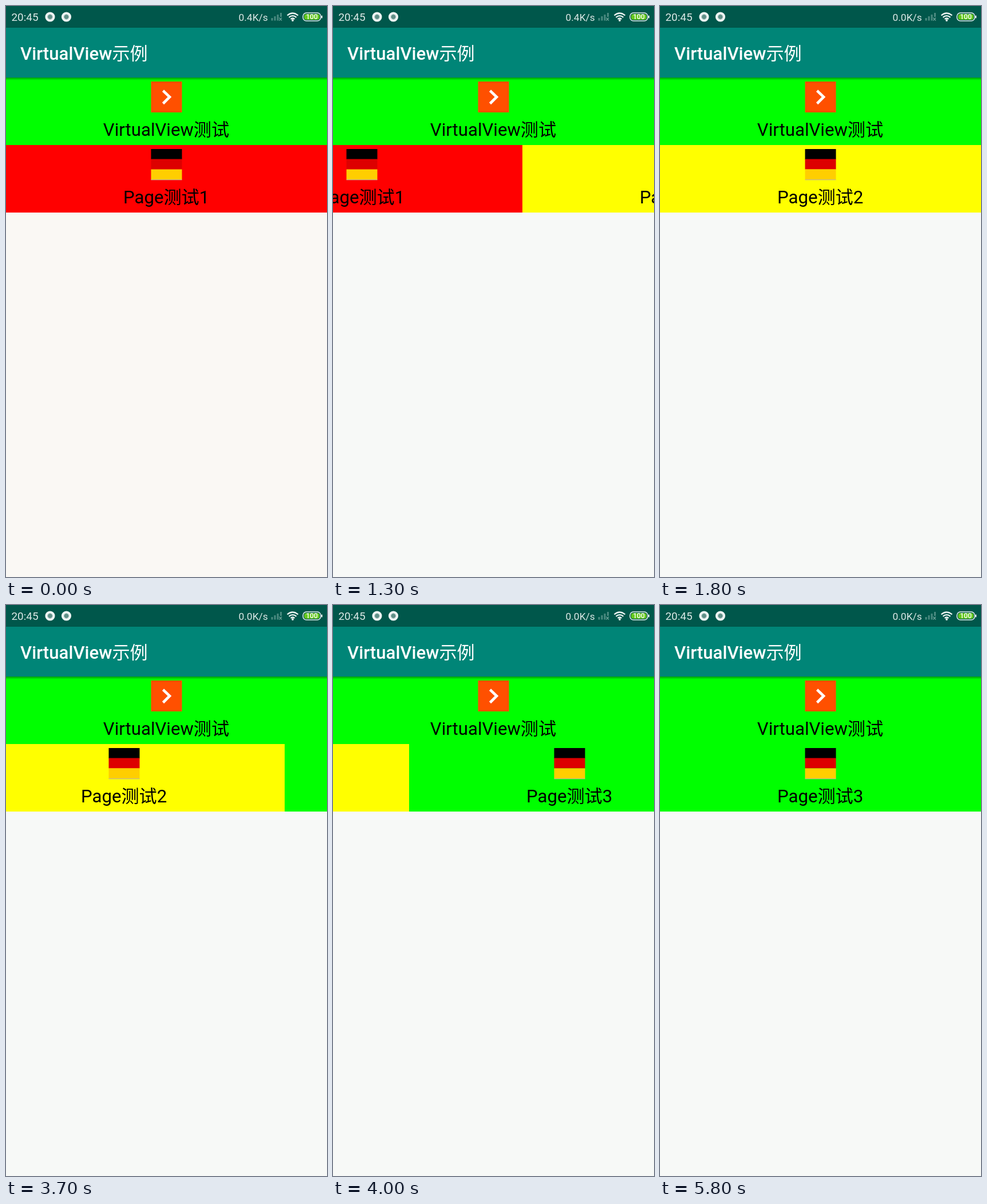
These frames come from a looping animation (561 px wide and 998 px high, 6300 ms). An HTML page:

```html
<!DOCTYPE html>
<html lang="zh">
<head>
<meta charset="utf-8">
<title>VirtualView示例</title>
<style>
  html, body { margin: 0; width: 100%; height: 100%; overflow: hidden; }
  svg { display: block; width: 561px; height: 998px; }
  text { font-family: Roboto, "Noto Sans CJK SC", "Noto Sans CJK", sans-serif; font-size: 31.16px; }
  .zh { font-weight: 300; }
</style>
</head>
<body>
<svg viewBox="0 0 561 998">
  <defs>
    <linearGradient id="shade" x2="0" y2="1">
      <stop stop-color="#003c20" stop-opacity=".5"/>
      <stop offset="1" stop-color="#003c20" stop-opacity="0"/>
    </linearGradient>
    <g id="flag">
      <rect x="253.5" y="250" width="54" height="18" fill="#000"/>
      <rect x="253.5" y="267.5" width="54" height="18" fill="#d00"/>
      <rect x="253.5" y="285.5" width="54" height="18" fill="#ffce00"/>
      <rect x="253.5" y="303" width="54" height="1.3" fill="#c8b888"/>
    </g>
    <g id="dot">
      <circle r="8.6" fill="#eef4f3"/>
      <circle r="4.2" fill="#5f8f87" stroke="#a9c3be"/>
    </g>
  </defs>

  <rect id="backdrop" width="561" height="998"/>
  <g id="pages"></g>

  <rect y="125" width="561" height="118" fill="#0f0"/>
  <rect y="125" width="561" height="5" fill="url(#shade)"/>
  <rect x="253.5" y="132" width="54" height="54" fill="#ff5000"/>
  <path d="M274.5 148 L286 159 L274.5 170.5" fill="none" stroke="#fff" stroke-width="4.6"/>
  <text x="280" y="227" text-anchor="middle">VirtualView<tspan class="zh">测试</tspan></text>

  <rect y="38" width="561" height="87" fill="#008577"/>
  <text x="25" y="93.5" fill="#fff" font-weight="500">VirtualView<tspan class="zh">示例</tspan></text>

  <rect width="561" height="38" fill="#00574b"/>
  <g fill="#dce8e6">
    <text x="9.5" y="26" style="font-size:18.9px">20:45</text>
    <text id="speed" x="406.5" y="26" style="font-size:17.4px"></text>
  </g>
  <use href="#dot" x="77" y="19"/>
  <use href="#dot" x="105.5" y="19"/>

  <g fill="#4a8a80">
    <path d="M463.5 21h3v4.500h-3zM468.500 18h3v7.500h-3zM473.500 15h3v10.500h-3zM479 12h3v7h-3z"/>
    <path d="M477.500 20.500l4.500 5m0-5l-4.500 5" fill="none" stroke="#6ba097" stroke-width="1.400"/>
  </g>
  <g fill="none" stroke="#eef4f3" stroke-width="2.200">
    <path d="M491.500 16.500Q501 8.500 510.500 16.500M494.500 19.800Q501 14.300 507.500 19.800M497.500 23Q501 20 504.500 23"/>
    <circle cx="501" cy="25" r=".8"/>
  </g>
  <rect x="519" y="12" width="31" height="14" rx="6" fill="#00574b" stroke="#e6f0ee" stroke-width="1.500"/>
  <rect x="521" y="14" width="27" height="10" rx="4" fill="#64c81e"/>
  <rect x="551" y="16.500" width="2" height="5" rx="1" fill="#e6f0ee"/>
  <text x="534.500" y="23.300" text-anchor="middle" fill="#fff" font-weight="500" style="font-size:12px">100</text>
</svg>
<script>
const LOOP = 6300, STEP = 100, WIDTH = 561;
const SLIDE_STARTS = [1105, 3637], SLIDE_SPEED = 1.178; // ms, px per ms
const [backdrop, pages, speed] = ["backdrop", "pages", "speed"].map(id => document.getElementById(id));

pages.innerHTML = ["#f00", "#ff0", "#0f0"].map((color, i) => `
  <g transform="translate(${i * WIDTH})">
    <rect y="243" width="${WIDTH}" height="118" fill="${color}"/>
    <use href="#flag"/>
    <text x="205" y="345">Page<tspan class="zh">测试</tspan>${i + 1}</text>
  </g>`).join("");

const slide = (time, start) =>
  Math.round(Math.min(WIDTH, Math.max(0, (time - start) * SLIDE_SPEED)));

function render(now) {
  const time = Math.floor((now % LOOP) / STEP) * STEP;
  const offset = SLIDE_STARTS.reduce((sum, start) => sum + slide(time, start), 0);
  pages.setAttribute("transform", `translate(${-offset})`);
  backdrop.setAttribute("fill", time < 1300 ? "#faf8f4" : "#f7f9f7");
  speed.textContent = time < 1800 ? "0.4K/s" : "0.0K/s";
}

let origin;
function tick(now) {
  origin ??= now;
  render(now - origin);
  requestAnimationFrame(tick);
}
render(0);
requestAnimationFrame(tick);
</script>
</body>
</html>
```
